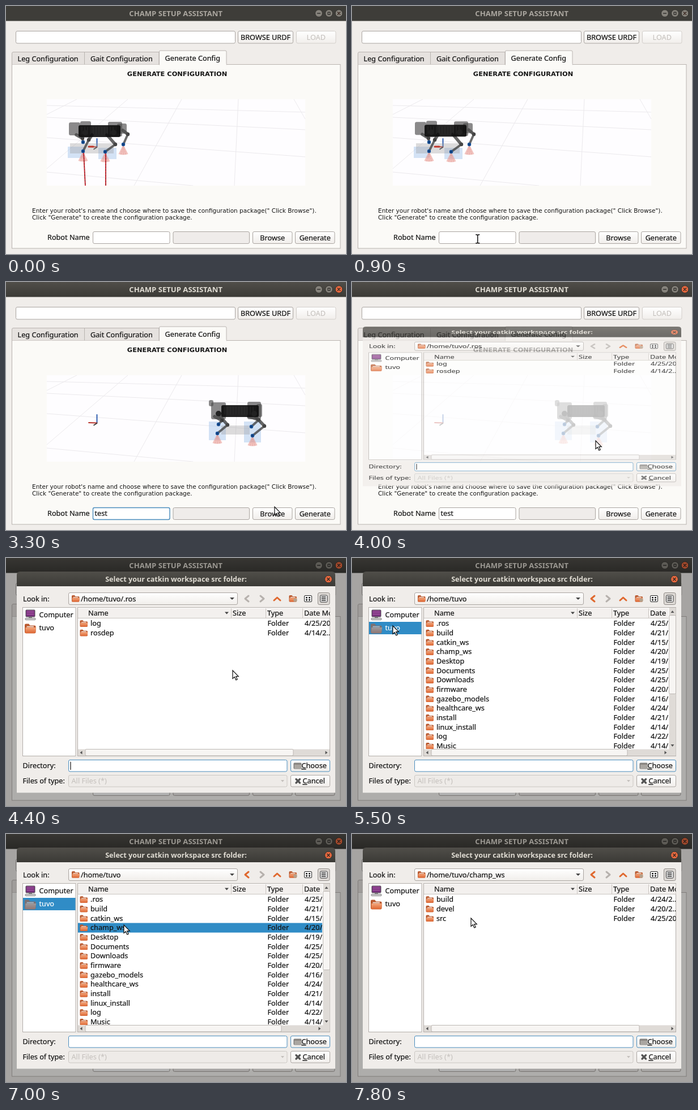
An HTML page for the animation above (8 s loop, 600 by 439 pixels).

```html
<!DOCTYPE html>
<html lang="en">
<head>
<meta charset="utf-8">
<title>Setup assistant</title>
<style>
  html, body { margin: 0; width: 100%; height: 100%; overflow: hidden; background: #f0edea; }
  svg { display: block; width: 600px; height: 439px; }
  text { font: 12.7px "Noto Sans", "Open Sans", sans-serif; color: #141414; fill: currentColor; stroke: currentColor; stroke-width: .22px; white-space: pre; }
  .title { font-size: 13.1px; font-weight: 700; text-anchor: middle; color: #dfdbd2; stroke: none; }
  .sub { font-size: 12.6px; }
  .mid { text-anchor: middle; }
  .off { color: #c3bfbb; stroke: none; }
  .head { font: 700 11.36px "DejaVu Sans", sans-serif; text-anchor: middle; stroke: none; }
  .note { font: 10.52px "DejaVu Sans", sans-serif; stroke: none; }
  .line { fill: none; stroke-linecap: round; stroke-linejoin: round; }
</style>
</head>
<body>
<svg id="stage" viewBox="0 0 600 439" xmlns="http://www.w3.org/2000/svg">
  <defs>
    <linearGradient id="bar" x2="0" y2="1"><stop stop-color="#504e49"/><stop offset="1" stop-color="#3b3a36"/></linearGradient>
    <linearGradient id="btn" x2="0" y2="1"><stop stop-color="#fff"/><stop offset="1" stop-color="#f1eeeb"/></linearGradient>
    <linearGradient id="orange" x2="0" y2="1"><stop stop-color="#f4a67c"/><stop offset="1" stop-color="#dc6430"/></linearGradient>
    <clipPath id="view"><rect x="72" y="165" width="456" height="153"/></clipPath>
    <clipPath id="list"><rect id="listBox" x="127" y="89" height="249"/></clipPath>
    <g id="folder">
      <path d="M0 1.5Q0 0 1.5 0H5l1.5 2H12q1.5 0 1.5 1.5V10q0 1.5-1.5 1.5H1.5Q0 11.5 0 10Z" fill="#b9592f"/>
      <path d="M1 4.5H14L13 10.5Q12.8 11.5 12 11.5H1.5Q.5 11.5 .6 10.5Z" fill="url(#orange)"/>
      <path d="M2.5 3.5H11" stroke="#f7e6dc" stroke-width="1.2"/>
    </g>
  </defs>
  <g id="main"></g>
  <rect id="dim" width="600" height="439" fill="#000"/>
  <g id="dialog"></g>
  <path id="arrow" d="M0 0V14.5L3.4 11.5 5.8 17 8.2 16 5.8 10.7H10.3Z" fill="#fff" stroke="#111" stroke-width="1.2"/>
  <path id="beam" class="line" d="M-3-7.5Q-.5-7.5 0-6.5Q.5-7.5 3-7.5M0-6.5V6.5M-3 7.5Q-.5 7.5 0 6.5Q.5 7.5 3 7.5" stroke="#111" stroke-width="1.5"/>
</svg>
<script>
const LOOP = 8000, STEP = 100, USER = 'tuvo', BLUE = '#4a8dbd';
const TIMES = { active: 1400, browse: 3500, open: 3882, home: 5500, pick: 7000, enter: 7250 };
const $ = id => document.getElementById(id);
const set = (id, attrs) => { for (const k in attrs) $(id).setAttribute(k, attrs[k]); };
const show = (id, on) => $(id).setAttribute('visibility', on ? 'inherit' : 'hidden');
const clamp = v => Math.max(0, Math.min(1, v));
const mix = (a, b, k) => a + (b - a) * k;

const text = (x, y, s, cls = '', extra = '') => `<text x="${x}" y="${y}" class="${cls}" ${extra}>${s}</text>`;
const box = (x, y, w, h, fill, stroke = 'none', r = 0, extra = '') =>
  `<rect x="${x}" y="${y}" width="${w}" height="${h}" rx="${r}" fill="${fill}" stroke="${stroke}" ${extra}/>`;
const line = (d, color, w = 1, extra = '') =>
  `<path class="line" d="${d}" stroke="${color}" stroke-width="${w}" ${extra}/>`;
const dot = (x, y, r, fill, extra = '') => `<circle cx="${x}" cy="${y}" r="${r}" fill="${fill}" ${extra}/>`;
const field = (x, y, w, h, id, fill = '#fff') => box(x, y, w, h, fill, '#aaa5a1', 2.5, id ? `id="${id}"` : '');
const button = (x, y, w, h, label, cls = '') =>
  box(x, y, w, h, 'url(#btn)', cls ? '#d3cfcb' : '#aaa5a1', 2.5) + text(x + w / 2, y + h / 2 + 4.5, label, 'mid ' + cls);
const folder = (x, y, s = 1) => `<use href="#folder" transform="translate(${x} ${y}) scale(${s})"/>`;
const closeBtn = (x, y, id) => dot(x, y, 6.4, '#e8693f', `id="${id}" stroke="#33322e"`) +
  line(`M${x - 2.2} ${y - 2.2}l4.4 4.4m0-4.4l-4.4 4.4`, '#3c2a22', 1.5);

function mainWindow() {
  const grid = ['M72 176L528 188', 'M72 197L528 219', 'M72 233L528 267', 'M72 294L330 318',
    'M125 165L72 192', 'M215 165L72 288', 'M310 165L226 318', 'M410 165L403 318', 'M508 165L528 200'];
  return box(0, 0, 600, 439, '#f0edea') + box(0, 0, 600, 26.5, 'url(#bar)', 'none', 0, 'id="mainBar"') +
    text(299.7, 17.7, 'CHAMP SETUP ASSISTANT', 'title', 'id="caption"') +
    [552, 570].map(x => dot(x, 13, 6.4, '#86837c', 'stroke="#33322e"')).join('') +
    line('M549.5 13h5', '#33322e', 1.4) + line('M568 11h4v4h-4z', '#33322e', 1.3) + closeBtn(587.5, 13, 'close') +
    field(17.5, 44.5, 387, 21.5) + button(409.5, 44.5, 97, 21.5, 'BROWSE URDF') +
    button(512.5, 44.5, 69.5, 21.5, 'LOAD', 'off') +
    box(10.5, 103.5, 579.5, 325.5, '#fbfaf7', '#b9b4b0') +
    line('M10.5 103.5V84q0-2.5 2.5-2.5H270V103.5M138.5 82V103', '#b9b4b0', 1, 'style="fill:#e6e2df"') +
    line('M270.5 104V81q0-2 2-2H387q2 0 2 2V104', '#b9b4b0', 1, 'style="fill:#fbfaf7"') + box(271, 102, 117.5, 4, '#fbfaf7') +
    text(20.5, 97.5, 'Leg Configuration') + text(149, 97.5, 'Gait Configuration') + text(280.5, 97, 'Generate Config') +
    text(302, 123.7, 'GENERATE CONFIGURATION', 'head') +
    box(72, 165, 456, 153, '#fefdff') +
    `<g clip-path="url(#view)">${grid.map(d => line(d, '#ebe9ec')).join('')}
      ${line('M160.5 249V235', '#1d4fa8', 1.8)}${line('M160.5 249.5L146 249', '#b8332c', 1.8)}${line('M160.5 250L155 253.5', '#333', 1.5)}
      <g id="robot"></g></g>` +
    text(46, 366, 'Enter your robot\'s name and choose where to save the configuration package(" Click Browse").', 'note') +
    text(46, 378, 'Click "Generate" to create the configuration package.', 'note') +
    text(73, 414.2, 'Robot Name') + field(153.5, 399.5, 135.5, 21, 'name') + text(156.5, 414.2, '', '', 'id="typed"') +
    line('M0 403.5V416', '#111', 1, 'id="nameCaret"') +
    field(295, 399.5, 134.5, 21, '', '#efecea') + button(435.5, 399.5, 69.5, 21, 'Browse') +
    button(510.5, 399.5, 69.5, 21, 'Generate');
}

function dialog() {
  const chevron = (x, dir, color, id) => line(`M${x + 3 * dir} 67l${-6 * dir} 5 ${6 * dir} 5`, color, 3, `id="${id}"`);
  return `<path d="M19 50V30q0-6 6-6H575q6 0 6 6V50Z" fill="url(#bar)"/>` + box(19, 50, 562, 365.5, '#f0edea') +
    text(300, 42, 'Select your catkin workspace src folder:', 'title sub') + closeBtn(569, 37.5, 'close2') +
    text(30, 76.5, 'Look in:') + box(110.5, 61.5, 298, 21, 'url(#btn)', '#aaa5a1', 2.5) +
    folder(116, 66) + text(132, 76.5, '', '', 'id="path"') + '<path d="M395 70h8l-4 4z" fill="#444"/>' +
    chevron(425, 1, '#b6b1ad', 'back') + chevron(452, -1, '#b6b1ad', 'next') +
    line('M473 75l5.5-5 5.5 5', '#e0692f', 3) + folder(499.5, 66) + dot(510.5, 74.5, 3.2, '#b5a08a') +
    box(526.5, 66.5, 13, 11, '#fff', '#222', 1.5) +
    [529, 534].map(x => box(x, 69, 3, 2.5, '#222') + box(x, 73, 3, 2.5, '#222')).join('') +
    box(550.5, 61.5, 20.5, 21, '#dedad6', '#8f8a86', 2.5) + box(554.5, 66, 12.5, 12, '#fff', '#222', 1.5) +
    line('M557 69h7m-7 3h7m-7 3h7', '#222', 1.4) +
    box(29.5, 87.5, 93.5, 263, '#fff', '#b3aeaa') +
    box(30, 113, 92.5, 22, '#308cc6', 'none', 0, 'id="side"') +
    box(35, 92, 16, 12, '#722c78', '#555', 1) + line('M37 94h12m-12 3h12m-12 3h12', '#bb69b5', 1.2) +
    box(40, 104, 6, 3, '#888') + box(34, 106.5, 18, 3, '#ddd', '#777', 1) +
    text(58.5, 105, 'Computer') + folder(33, 116.5, 1.45) +
    box(33, 116.5, 20, 17, '#308cc6', 'none', 2, 'id="sideTint" opacity=".45"') +
    text(58.5, 128.2, USER, '', 'id="sideText"') +
    box(126.5, 87.5, 445, 263, '#fff', '#b3aeaa') +
    `<g clip-path="url(#list)">${box(127, 88, 445, 18.5, '#f3f0ee')}${line('M127 106.5H572M397.5 89V106M458.5 89V106M523.5 89V106', '#cbc6c2')}
      ${text(145, 102.2, 'Name')}${text(400, 102.2, 'Size')}${text(461, 102.2, 'Type')}${text(526, 102.2, 'Date Modified')}
      <path d="M386 95.5h7l-3.5 4z" fill="#444"/>
      ${box(127, 157.5, 445, 17, '#308cc6', 'none', 0, 'id="rowPick"')}<g id="rows"></g></g>` +
    box(127, 338.5, 444, 11.5, '#dfdbd7') + box(140, 338.5, 367, 11.5, '#f7f5f3', '#bcb7b3', 2, 'id="thumb"') +
    '<path d="M134.5 341.5v6l-4-3z" fill="#555"/><path id="rightTip" d="M563.5 341.5v6l4-3z" fill="#555"/>' +
    `<g id="scroll">${box(559.5, 88, 12, 262, '#dfdbd7')}${box(559.5, 101.5, 12, 139, '#f7f5f3', '#bcb7b3', 2)}
      <path d="M562.5 97h6l-3-4zM562.5 330h6l-3 4z" fill="#555"/></g>` +
    text(29.5, 372, 'Directory:') + box(110.5, 357.5, 385.5, 20.5, '#fff', BLUE, 2.5) +
    line('M114 361V374.5', '#111', 1.2, 'id="dirCaret"') +
    text(29.5, 399.2, 'Files of type:') + box(110.5, 384.5, 385.5, 20.5, '#eeebe8', '#cbc7c3', 2.5) +
    text(115.5, 399.2, 'All Files (*)', 'off') + '<path d="M485 393h6l-3 3.5z" fill="#c3bfbb"/>' +
    box(502.5, 357.5, 69, 20.5, 'url(#btn)', BLUE, 2.5) + box(508, 363, 13, 10, '#8d8984', '#777', 1) + box(509, 366, 12.5, 7, '#aaa6a1') +
    text(521.5, 372, '<tspan text-decoration="underline">C</tspan>hoose') +
    box(502.5, 384.5, 69, 20.5, 'url(#btn)', '#aaa5a1', 2.5) + line('M512 391.5l6.5 6.5m0-6.5l-6.5 6.5', '#555', 3.4) +
    text(523.5, 399.2, '<tspan text-decoration="underline">C</tspan>ancel');
}

const FOLDERS = {
  ['/home/' + USER + '/.ros']: 'log 4/25/2020,rosdep 4/14/2…',
  ['/home/' + USER]: '.ros 4/25/2,build 4/21/2,catkin_ws 4/15/2,champ_ws 4/20/2,Desktop 4/19/2,Documents 4/25/2,' +
    'Downloads 4/25/2,firmware 4/20/2,gazebo_models 4/16/2,healthcare_ws 4/24/2,install 4/21/2,' +
    'linux_install 4/14/2,log 4/22/2,Music 4/14/2',
  ['/home/' + USER + '/champ_ws']: 'build 4/24/2…,devel 4/20/2…,src 4/25/2020',
};
const PATHS = Object.keys(FOLDERS);

function listing(path) {
  return FOLDERS[path].split(',').map((item, i) => {
    const [name, date] = item.split(' '), y = 120.2 + i * 16.67;
    return folder(130.5, y - 10) + text(149, y, name) + text(461.5, y, 'Folder') + text(527, y, date);
  }).join('');
}

// Each leg is hip, knee, foot; the two rows are the start and end poses.
const LEGS = [
  [[124, 228, 135, 234, 136, 241], [152, 228, 146, 237, 136, 257], [178, 228, 193, 245, 175, 258], [206, 220, 215, 227, 207, 245]],
  [[368, 238, 381, 245, 375, 252], [378, 238, 391, 253, 373, 268], [440, 238, 456, 255, 435, 272], [428, 238, 446, 244, 433, 256]],
];
// x, y, width, height of each body block, start then end.
const BLOCKS = [
  [[111, 206, 20, 23], [358, 209, 8, 11]], [[131, 204, 19, 29], [362, 213, 26, 30]],
  [[180, 205, 25, 26], [426, 212, 24, 31]], [[196, 208, 17, 18], [442, 216, 10, 23]],
  [[128, 211, 74, 21], [380, 218, 66, 21]],
];

function robot(t) {
  const k = clamp((t - 2000) / 1300), walking = k > 0 && k < 1;
  const stance = t < 1900 && t % 1000 < 500;
  const bob = walking || t < 2000 ? Math.sin(t * Math.PI / 250) * .8 : 0;
  const lerp = (a, b) => a.map((v, i) => mix(v, b[i], k));
  const ghost = (a, b, fill, o) => box(...lerp(a, b), fill, 'none', 0, `opacity="${o}"`);
  let out = ghost([109, 249, 28, 20], [358, 247, 30, 33], '#a9c8ec', .5) +
    ghost([163, 251, 32, 20], [420, 247, 30, 37], '#a9c8ec', .5) +
    ghost([113, 243, 77, 18], [380, 254, 50, 16], '#9a9a9a', .35);
  const legs = LEGS[0].map((leg, i) => {
    const p = lerp(leg, LEGS[1][i]);
    if (walking) {
      const swing = Math.sin(t * Math.PI / 200 + (i % 2) * Math.PI);
      p[4] += swing * 4;
      p[5] -= Math.max(0, swing) * 5;
    }
    return p;
  });
  legs.forEach(([, , , , x, y], i) => {
    const o = i === 0 ? 0 : i === 3 ? 1 - k : 1;
    if (o) out += `<path d="M${x} ${y}l-8.5 17q8.5 3 17 0z" fill="#e79b92" opacity="${o * .6}"/>` +
      line(`M${x} ${y + 2}l-4 15m4-15v16m0-16l4 15`, '#d98278', .8, `opacity="${o * .6}" stroke-dasharray="1.5 2"`);
    if (stance && (i === 1 || i === 2)) {
      const force = `M${x + 1} ${y + 2}L${x + (i === 1 ? 4 : 1)} 319`;
      out += line(force, '#cf2430', 1.9) + line(force, '#4c3d32', 1, 'stroke-dasharray="1 4"');
    }
  });
  legs.forEach(([hx, hy, kx, ky, x, y]) => {
    out += line(`M${hx} ${hy + bob}L${kx} ${ky}`, '#333', 5.5, 'opacity=".75"') +
      line(`M${kx} ${ky}L${x} ${y}`, '#3a3a3a', 4, 'opacity=".75"') +
      dot(kx, ky, 3.2, '#444') + dot(x, y, 3.2, '#174f95') + dot(x, y, 1.1, '#0c2b58');
  });
  BLOCKS.forEach(([a, b], i) => {
    const [x, y, w, h] = lerp(a, b);
    out += box(x, y + bob, w, h, i === 4 ? '#0d0d0d' : '#4b4b4b', 'none', 3, `opacity="${i === 4 ? .9 : .65}"`);
  });
  const [x, y, w] = lerp(...BLOCKS[4]);
  for (let i = 6; i < w - 8; i += 5) out += line(`M${x + i} ${y + 3 + bob}v13`, '#353535', .7);
  out += dot(mix(140, 375, k), mix(224, 233, k) + bob, 5, '#222') + dot(mix(190, 438, k), mix(224, 233, k) + bob, 5, '#222');
  if (t < 2100) out += line('M146 249h8', '#c1362a', 3);
  return out;
}

// time, x, y of the pointer tip
const TRACK = [
  [0, 290, 470], [500, 280, 450], [1000, 215, 408], [1300, 191, 409], [2500, 191, 409], [2750, 300, 430],
  [3000, 425, 428], [3300, 474, 398], [3600, 474, 399], [4000, 430, 281], [4400, 400, 199], [5100, 72, 120],
  [5600, 72, 120], [6200, 356, 114], [6800, 208, 161], [7300, 208, 161], [7800, 210, 149], [8000, 210, 149],
];

function pointer(t) {
  const i = TRACK.findIndex(p => p[0] > t), [t0, x0, y0] = TRACK[i - 1], [t1, x1, y1] = TRACK[i];
  const p = (t - t0) / (t1 - t0), k = p * p * (3 - 2 * p);
  return [mix(x0, x1, k), mix(y0, y1, k)];
}

let place = -1;
function showFolder(next) {
  if (place === next) return;
  place = next;
  const full = next === 1;
  $('path').textContent = PATHS[next];
  $('rows').innerHTML = listing(PATHS[next]);
  set('listBox', { width: full ? 431 : 444.5 });
  set('thumb', { width: full ? 346 : 367 });
  set('rightTip', { transform: `translate(${full ? -12 : 0} 0)` });
  for (const id of ['scroll', 'side', 'sideTint']) show(id, full);
  set('sideText', { style: full ? 'color:#fff' : '' });
  set('back', { stroke: next ? '#e0692f' : '#b6b1ad' });
}

function render(t) {
  const active = t >= TIMES.active, focus = active && t < TIMES.browse;
  set('mainBar', { fill: active ? 'url(#bar)' : '#3e3d39' });
  set('caption', { style: active ? '' : 'color:#aaa69f' });
  set('close', { fill: active ? '#e8693f' : '#86837c' });
  set('name', { stroke: focus ? BLUE : '#aaa5a1', 'stroke-width': focus ? 1.4 : 1 });
  const typed = 'test'.slice(0, [1900, 2150, 2300, 2500].filter(at => t >= at).length);
  $('typed').textContent = typed;
  set('nameCaret', { transform: `translate(${157.5 + $('typed').getComputedTextLength()} 0)` });
  show('nameCaret', focus && (t - TIMES.active) % 1000 < 700);
  if (t < 4200) $('robot').innerHTML = robot(Math.min(t, TIMES.browse));

  const p = clamp((t - TIMES.open) / 250), grow = 1 - (1 - p) ** 2;
  set('dim', { opacity: .31 * clamp((t - 4000) / 300) });
  set('dialog', { opacity: grow, transform: `translate(0 221) scale(1 ${grow}) translate(0 ${-220 - grow})` });
  show('dialog', grow > 0);
  showFolder(t >= TIMES.enter ? 2 : t >= TIMES.home ? 1 : 0);
  show('rowPick', t >= TIMES.pick && t < TIMES.enter);
  show('dirCaret', t < TIMES.home && (t - TIMES.open) % 1000 < 600);

  const [x, y] = pointer(t), inField = x > 153 && x < 289 && y > 399 && y < 421 && t < TIMES.open;
  set('arrow', { transform: `translate(${x} ${y})` });
  set('beam', { transform: `translate(${x} ${y})` });
  show('arrow', !inField);
  show('beam', inField);
}

$('main').innerHTML = mainWindow();
$('dialog').innerHTML = dialog();
const start = performance.now();
function tick() {
  const t = (performance.now() - start) % LOOP;
  render(Math.floor(t / STEP) * STEP);
  requestAnimationFrame(tick);
}
tick();
</script>
</body>
</html>
```
